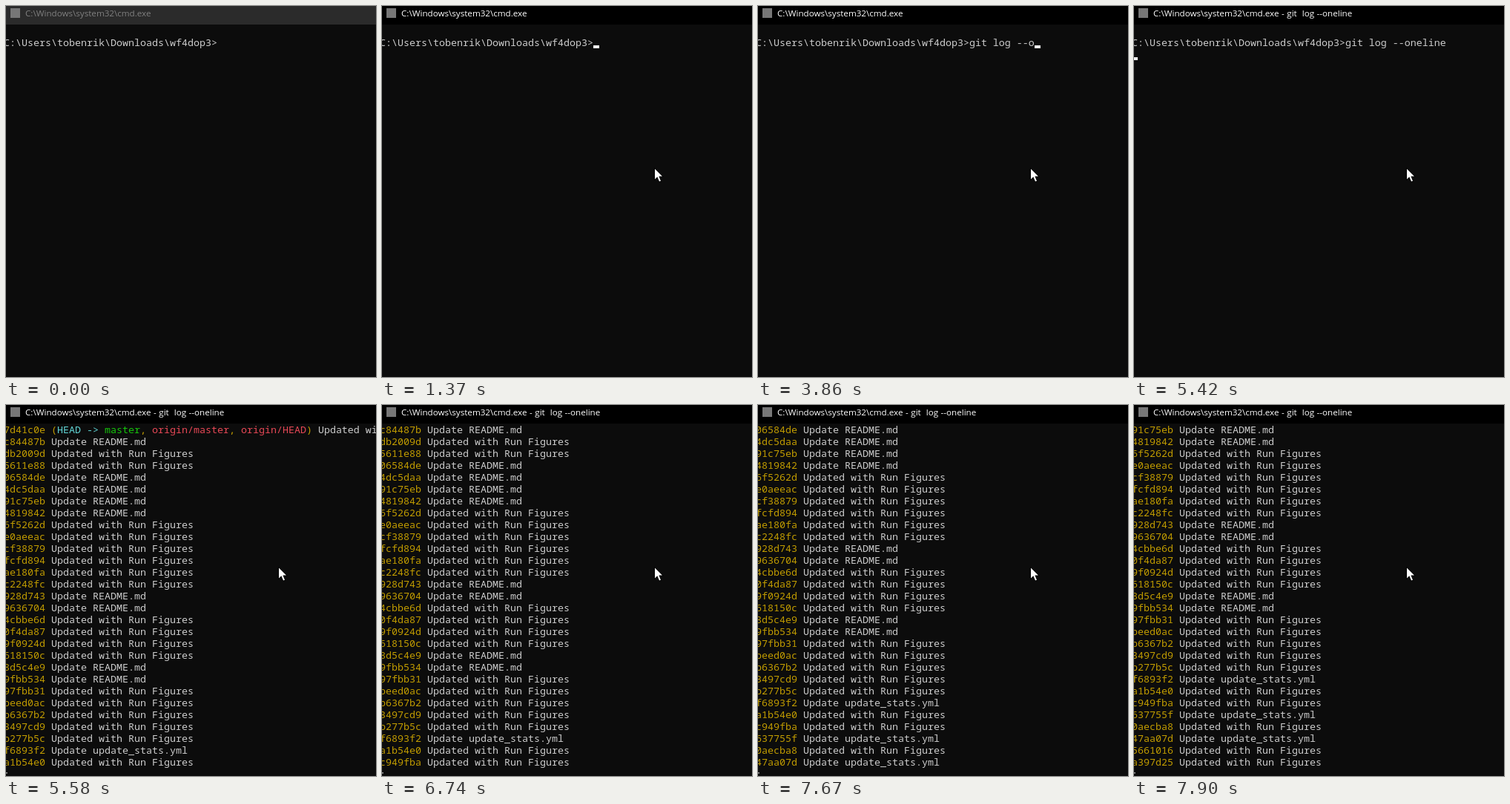
Recreate the animation shown at these times as an HTML page. Size 499 by 500 pixels, loop 8 s.

```html
<!DOCTYPE html>
<html lang="en">
<head>
<meta charset="utf-8">
<title>Terminal log</title>
<style>
  html, body { margin: 0; width: 100%; height: 100%; overflow: hidden; background: #0c0c0c; }
  #stage { position: relative; width: 499px; height: 500px; overflow: hidden; background: #0c0c0c; }
  #stage * { position: absolute; }
  #bar { left: 0; top: 0; width: 499px; height: 25px; background: #2b2b2b; color: #808080; }
  #bar.active { background: #000; color: #fff; }
  #icon { left: 6px; top: 3px; width: 13px; height: 13px; background: #777; }
  #title { left: 26px; top: 2px; white-space: pre; word-spacing: .5px;
           font: 11.63px/16px "Open Sans", "Noto Sans", sans-serif; }
  #screen { left: 0; top: 25px; width: 499px; height: 472px; overflow: hidden; }
  .line { left: -3px; height: 16px; white-space: pre; color: #ccc;
          font: 13.333px/16px "Noto Sans Mono", "DejaVu Sans Mono", monospace; }
  #stage .line span { position: static; }
  #view { left: 0; top: 0; width: 499px; height: 464px; overflow: hidden; }
  #caret { width: 8px; height: 4px; background: #f2f2f2; }
  #mouse { left: 0; top: 0; width: 12px; height: 20px; overflow: visible; }
  .hash { color: #c19c00; }
  .head { color: #61d6d6; }
  .local { color: #16c60c; }
  .remote { color: #e74856; }
</style>
</head>
<body>
<div id="stage">
  <div id="bar"><div id="icon"></div><div id="title"></div></div>
  <div id="screen">
    <div id="prompt" class="line" style="top:16px"></div>
    <div id="caret"></div>
    <div id="log">
      <div id="view"><div id="rows"></div></div>
      <div class="line" style="top:464px">:</div>
    </div>
  </div>
  <svg id="mouse" viewBox="0 0 12 20">
    <path d="M1 1.5V15.5L4.3 12.3L7 18.5L9 17.7L6.4 11.5H11Z"
          fill="#fff" stroke="#000" stroke-width="1.6" paint-order="stroke"/>
  </svg>
</div>
<script>
const LOOP = 8000, ROW = 16, COL = 8, LEFT = -3;
const FOCUS = 900, ENTER = 5270, PAGE = 5580;
const PATH = 'C:\\Users\\tobenrik\\Downloads\\wf4dop3>';
const COMMAND = 'git log --oneline';
const SHELL = 'C:\\Windows\\system32\\cmd.exe';
const KEYS = [1690, 1800, 2020, 2150, 2300, 2560, 2690, 2840, 3390, 3560,
              3860, 4160, 4270, 4400, 4600, 4730, 4870];
const SCROLLS = [6740, 7120, 7290, 7520, 7710, 7900];

const MESSAGES = { U: 'Updated with Run Figures', R: 'Update README.md', S: 'Update update_stats.yml' };
const KINDS = 'RUURRRRUUUUUURRUUUURRUUUUUSUUSUSUU';
const HASHES = ('c84487b db2009d 5611e88 06584de 4dc5daa 91c75eb 4819842 6f5262d e0aeeac ' +
  'cf38879 fcfd894 ae180fa c2248fc 928d743 9636704 4cbbe6d 0f4da87 9f0924d 618150c ' +
  '8d5c4e9 9fbb534 97fbb31 beed0ac b6367b2 3497cd9 b277b5c f6893f2 a1b54e0 c949fba ' +
  '637755f 0aecba8 47aa07d 5661016 a397d25').split(' ');

const $ = id => document.getElementById(id);
const bar = $('bar'), title = $('title'), promptLine = $('prompt'), caret = $('caret');
const log = $('log'), rows = $('rows'), mouse = $('mouse');

const span = (kind, text) => `<span class="${kind}">${text}</span>`;
const refs = span('hash', '(') + span('head', 'HEAD -&gt; ') + span('local', 'master') +
  span('hash', ', ') + span('remote', 'origin/master') + span('hash', ', ') +
  span('remote', 'origin/HEAD') + span('hash', ')');
const lines = [span('hash', '7d41c0e ') + refs + ' ' + MESSAGES.U]
  .concat(HASHES.map((h, i) => span('hash', h) + ' ' + MESSAGES[KINDS[i]]));
rows.innerHTML = lines.map((l, i) => `<div class="line" style="top:${i * ROW}px">${l}</div>`).join('');

const passed = (times, t) => times.filter(at => t >= at).length;
const show = (el, on) => { el.style.visibility = on ? 'visible' : 'hidden'; };
const move = (el, x, y) => { el.style.transform = `translate(${x}px, ${y}px)`; };
const setText = (el, s) => { if (el.textContent !== s) el.textContent = s; };

function caretOn(t) {
  if (t < 1370 || t >= PAGE) return false;
  return t >= ENTER || (t - 1370) % 1060 < 530;
}

function render(t) {
  const typed = passed(KEYS, t), entered = t >= ENTER, paged = t >= PAGE;

  bar.className = t >= FOCUS ? 'active' : '';
  setText(title, SHELL + (entered ? ' - git  log --oneline' : ''));

  setText(promptLine, PATH + COMMAND.slice(0, typed));
  show(promptLine, !paged);
  show(caret, caretOn(t));
  const col = entered ? 0 : PATH.length + typed;
  move(caret, LEFT + col * COL, (entered ? 2 : 1) * ROW + 12);

  show(log, paged);
  move(rows, 0, -ROW * passed(SCROLLS, t));

  const p = Math.min(1, Math.max(0, (t - 70) / 780));
  const away = (1 - p) ** 3;
  show(mouse, t >= 70);
  move(mouse, Math.round(367 + 120 * away), Math.round(218 + 270 * away));
}

const start = performance.now();
function tick() {
  render((performance.now() - start) % LOOP);
  requestAnimationFrame(tick);
}
tick();
</script>
</body>
</html>
```
